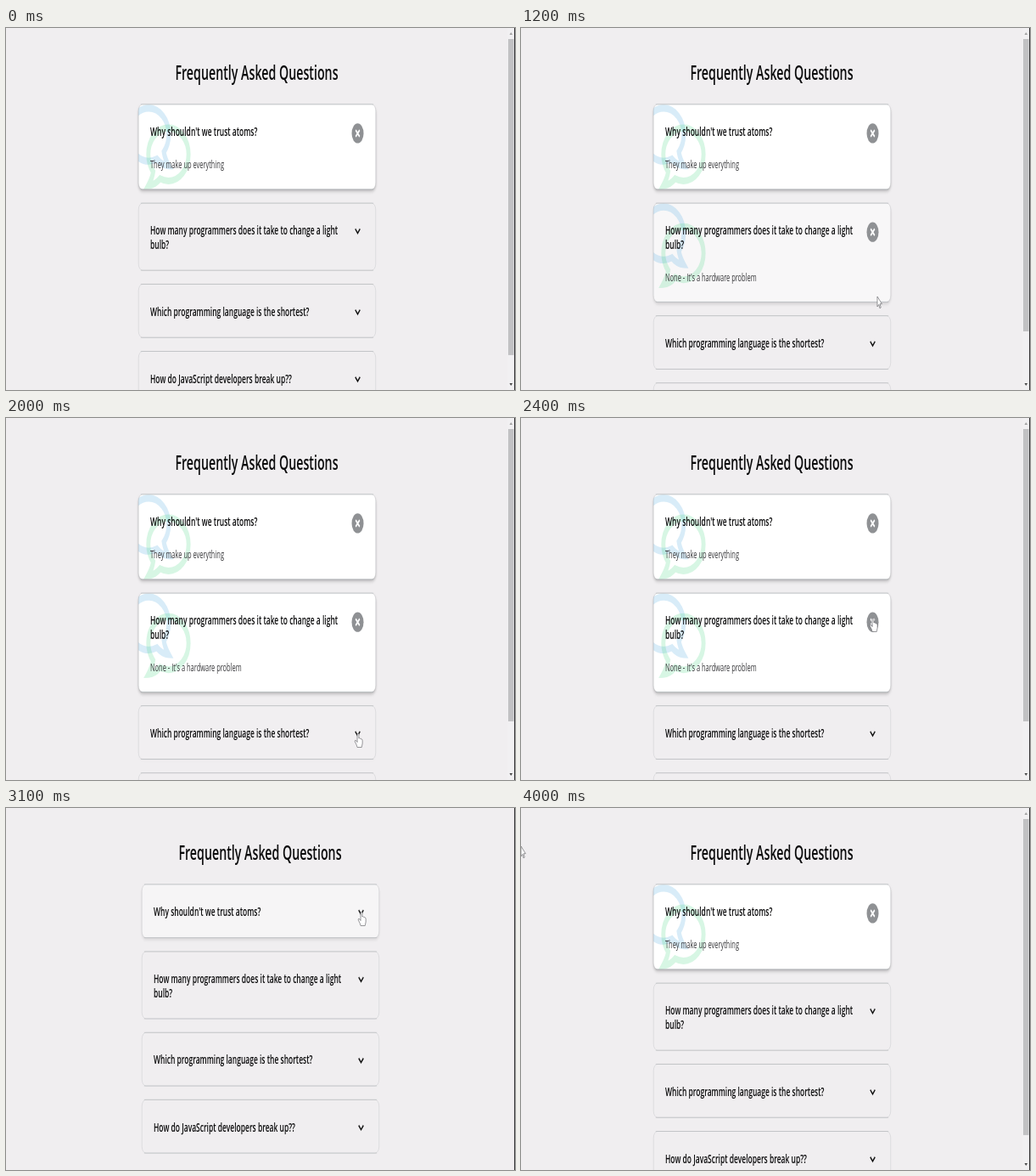
These frames come from a looping animation (600 by 426 pixels, 4.1 s). An HTML page:

```html
<!DOCTYPE html>
<html lang="en">
<head>
<meta charset="utf-8">
<title>FAQ accordion</title>
<style>
  html, body { margin: 0; width: 100%; height: 100%; overflow: hidden; background: #f0eef0; }
  svg { display: block; width: 100vw; height: 100vh; }
  text { font-family: "Open Sans", "Noto Sans", sans-serif; fill: #0b0b0c; }
  .title { font-size: 30.5px; font-weight: 600; text-anchor: middle; }
  .question { font-size: 18.2px; font-weight: 600; }
  .answer { font-size: 16px; fill: #38383b; }
  .fill { fill: #fff; filter: drop-shadow(0 3px 3px rgba(0, 0, 0, .16)) drop-shadow(0 2px 2px rgba(0, 0, 0, .12)); }
  .border { fill: none; stroke: #9fa4a8; opacity: .4; }
  .edge { fill: none; stroke: #9fa4a8; opacity: .7; }
  .bubble { fill: none; stroke-width: 48; opacity: .19; }
  .chevron { fill: none; stroke: #111; stroke-width: 2.6; }
  .close { fill: none; stroke: #fff; stroke-width: 3.2; }
  .cursor { fill: #fff; stroke: #66666b; stroke-width: 1.1; stroke-linejoin: round; }
</style>
</head>
<body>
<svg id="stage" viewBox="0 0 600 426" preserveAspectRatio="none"></svg>
<script>
const LOOP = 4100, STEP = 100, FADE = 300;
const SX = 280 / 600, SY = 0.775;   // the page is squeezed onto the stage
const stage = document.getElementById('stage');

// toggles: times at which a card opens or closes
const cards = [
  { lines: ["Why shouldn't we trust atoms?"], answer: 'They make up everything',
    height: 82, open: true, toggles: [3000, 3500] },
  { lines: ['How many programmers does it take to change a light', 'bulb?'],
    answer: "None - It's a hardware problem", height: 103, open: false, toggles: [1100, 2500] },
  { lines: ['Which programming language is the shortest?'], answer: "It's C",
    height: 82, open: false, toggles: [1400, 1800] },
  { lines: ['How do JavaScript developers break up??'], answer: '',
    height: 82, open: false, toggles: [] }
];

// time, x, y, shape
const route = [
  [1000, 418, 272, 'arrow'], [1100, 415, 238, 'hand'], [1200, 420, 316, 'arrow'],
  [1300, 415, 366, 'hand'], [2000, 415, 371, 'hand'], [2100, 416, 322, 'arrow'],
  [2300, 415, 236, 'hand'], [2500, 415, 234, 'hand'], [2600, 417, 169, 'hand'],
  [2800, 416, 122, 'hand'], [3100, 419, 122, 'hand'], [3500, 418, 123, 'hand'],
  [3800, 412, 122, 'hand'], [3900, 342, 111, 'arrow'], [4000, 0, 45, 'arrow']
];

const shapes = {
  arrow: 'M0 0V16L3.8 12.6 6.4 18.5 9 17.4 6.5 11.6H11.6Z',
  hand: 'M-2 1.5Q0-1 2 1.5V8Q4 6.5 5.5 8.5 7.5 7.5 8.8 9.6 11 9.2 11 11.5V16Q10 19 9 22H-2Q-3 18.5-8 13-8 10-5 11.5L-2 14Z'
};
const bubblePath = 'M256 56c128 0 232 82 232 184S384 424 256 424q-50 0-96-16-60 46-136 48 46-52 56-96-56-54-56-120C24 138 128 56 256 56z';

const mix = (a, b, u) => a + (b - a) * u;

// cubic-bezier(.25, .1, .25, 1)
function ease(x) {
  let lo = 0, hi = 1, s = x;
  for (let i = 0; i < 20; i++) {
    s = (lo + hi) / 2;
    const at = 0.75 * s * (1 - s) + s ** 3;
    if (at < x) lo = s; else hi = s;
  }
  return 0.3 * s * (1 - s) ** 2 + 3 * s * s * (1 - s) + s ** 3;
}

function cardState(card, t) {
  const past = card.toggles.filter(at => at <= t);
  const open = card.open !== (past.length % 2 === 1);
  const u = past.length ? ease(Math.min(1, (t - past[past.length - 1]) / FADE)) : 1;
  return { open, white: open ? u : 1 - u };
}

const bubble = (transform, color) =>
  `<path class="bubble" d="${bubblePath}" stroke="${color}" transform="${transform}"/>`;

function drawCard(card, { open, white }, x, y) {
  const height = card.height + (open ? 48 : 0);
  const box = `x=".5" y=".5" width="599" height="${height - 1}" rx="10"`;
  const bubbles = bubble('translate(82 -6) scale(-.21875 .21875)', '#3498db') +
    bubble('translate(20 24) scale(.21875)', '#2ecc71');
  const lines = card.lines.map((line, i) =>
    `<text class="question" x="30" y="${48.5 + 21.5 * i}">${line}</text>`).join('');
  const answer = `<text class="answer" x="30" y="${75.5 + 21.5 * card.lines.length}">${card.answer}</text>`;
  const toggle = open
    ? '<circle cx="554" cy="44.5" r="15" fill="#8f9194"/><path class="close" d="M549 39.5l10 10m0-10l-10 10"/>'
    : '<path class="chevron" d="M548 39.5l6 6.500 6-6.500"/>';
  return `<g transform="translate(${x} ${y}) scale(${SX} ${SY})">
    ${white > 0 ? `<rect class="fill" ${box} opacity="${white}"/>` : ''}
    ${open ? `<g clip-path="url(#inside)">${bubbles}</g>` : ''}
    <rect class="border" ${box}/><path class="edge" d="M6 .5H594M6 ${height - 0.5}H594"/>
    ${lines}${open ? answer : ''}${toggle}</g>`;
}

function drawScrollbar(openCount) {
  const thumb = 400 * 426 / (421 + 37.2 * openCount);
  return `<rect x="591" width="8" height="426" fill="#f1f0f2"/>
    <rect x="592" y="13" width="6.5" height="${thumb}" fill="#c1c1c3"/>
    <path d="M593.5 8l1.8-3 1.8 3z" fill="#a0a0a0"/>
    <path d="M593.5 418l1.8 3 1.8-3z" fill="#444"/>`;
}

function drawCursor(t) {
  if (t < route[0][0]) return '';
  let i = route.length - 1;
  while (route[i][0] > t) i--;
  const [t0, x0, y0, shape] = route[i];
  const [t1, x1, y1] = route[i + 1] || [t0 + STEP, x0, y0];
  const u = (t - t0) / (t1 - t0);
  return `<path class="cursor" d="${shapes[shape]}"
    transform="translate(${mix(x0, x1, u)} ${mix(y0, y1, u)}) scale(.47 .75)"/>`;
}

function render(t) {
  const states = cards.map(card => cardState(card, t));
  const openCount = states.filter(state => state.open).length;
  const left = openCount ? 156 : 160;
  let y = 89.5;
  let out = `<clipPath id="inside"><rect width="600" height="130" rx="10"/></clipPath>
    <rect width="600" height="426" fill="#f0eef0"/>
    <g transform="translate(${left + 139.5} 61) scale(${SX} ${SY})">
      <text class="title">Frequently Asked Questions</text></g>`;
  cards.forEach((card, i) => {
    out += drawCard(card, states[i], left, y);
    y += (card.height + (states[i].open ? 48 : 0) + 20) * SY;
  });
  if (openCount) out += drawScrollbar(openCount);
  out += '<rect x="599" width="1" height="426" fill="#3a3a3c"/>';
  stage.innerHTML = out + drawCursor(t);
}

let start = null, shown = -1;
function tick(now) {
  if (start === null) start = now;
  const time = (now - start) % LOOP;
  const step = time < 1000 ? 0 : Math.floor(time / STEP) * STEP;
  if (step !== shown) render(shown = step);
  requestAnimationFrame(tick);
}
render(0);
requestAnimationFrame(tick);
</script>
</body>
</html>
```
